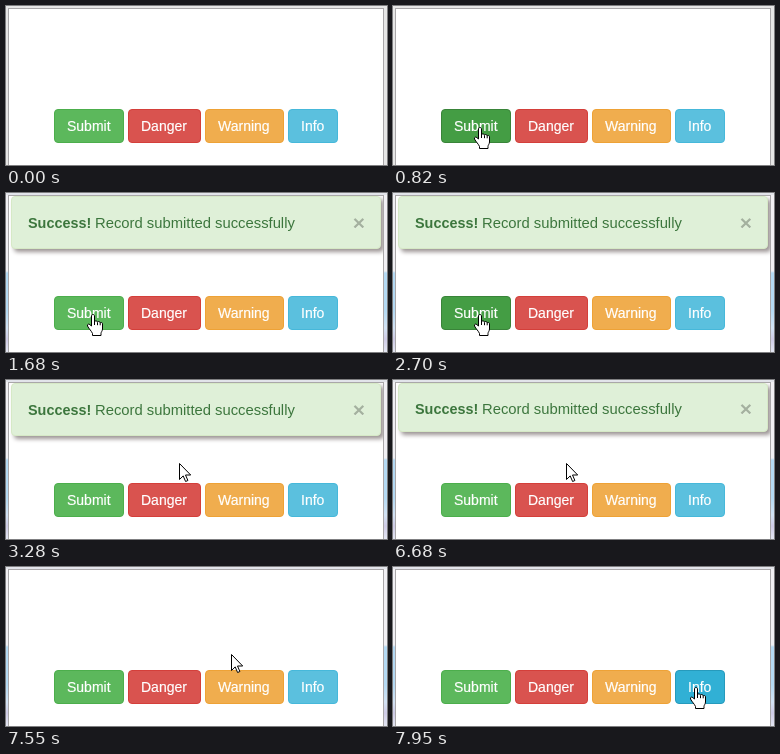
Recreate the animation shown at these times as an HTML page. Size 381x159 px, loop 8 s.

```html
<!DOCTYPE html>
<html lang="en">
<head>
<meta charset="utf-8">
<title>Alert demo</title>
<style>
html, body { margin: 0; width: 100%; height: 100%; overflow: hidden; }
body { position: relative; background: #e6e6e6; font: 14px/20px "Liberation Sans", Arial, sans-serif; }
body.glass {
  background:
    linear-gradient(#e2e4ea, #e2e4ea) 0 0 / 100% 2px no-repeat,
    linear-gradient(#f1f0f4 0 78px, #b4daf4 80px 118px, #d3e3f4 135px, #cfcbe6 146px, #e3e6f2 159px);
}
#page { position: absolute; left: 3px; top: 3px; width: 374px; height: 156px; overflow: hidden; background: #fff; }
#edge { position: absolute; left: 2px; top: 2px; width: 374px; height: 170px; border: 1px solid #a9a7a9; }
.btn {
  position: absolute; top: 100px; height: 34px; box-sizing: border-box; padding: 6px 12px;
  border: 1px solid; border-radius: 4px; white-space: nowrap;
}
.btn span { color: #fff; -webkit-text-stroke: .2px #fff; }
.focus { outline: 1px solid #6aa9d8; outline-offset: -1px; box-shadow: inset 0 3px 5px rgba(0, 0, 0, .125); }
#alert {
  position: absolute; left: 2px; top: 0; width: 370px; box-sizing: border-box; overflow: hidden;
  background: #dff0d8; border: 1px solid #d6e9c6; border-radius: 4px; box-shadow: 3px 3px 4px #9c9595;
  color: #3c763d; font-size: 14.8px; line-height: 21px; white-space: nowrap;
}
#alert > * { position: absolute; }
#alert b { left: 16px; margin-top: 1px; font-size: 14.4px; }
#alert span { left: 83px; margin-top: 1px; }
#alert i { right: 15px; font: bold 21px/21px "Liberation Sans", Arial, sans-serif; color: #000; opacity: .26; text-shadow: 0 1px 0 #fff; }
svg { position: absolute; left: 0; top: 0; width: 381px; height: 159px; }
</style>
</head>
<body>
<div id="edge"></div>
<div id="page">
  <div id="alert"><b>Success!</b><span>Record submitted successfully</span><i>×</i></div>
</div>
<svg fill="#fff" stroke="#000" stroke-linejoin="round">
  <path id="arrow" d="M.5 .5v16l3.7-3.6 2.4 5.6 2.3-1-2.4-5.5h5.2z"/>
  <path id="hand" d="M5.5 12V2c0-2 3-2 3 0v6c0-1.6 3-1.4 3 .3 .3-1.3 2.7-1 2.7.7 .4-1 2.3-.7 2.3.8v5.2c0 2-1.5 3-1.5 4.5v2h-8.5v-2c-1-2.5-3.5-4.5-5-7.5-.6-2 1.5-2.5 2.5-1.2zM8.5 8v3M11.5 8.5v2.7M14.2 9v2.3"/>
</svg>
<script>
const LOOP = 8000, CLICK = 1380, SHOW = 1680, GLASS = 1240;
const HIDE = 6585, SLIDE = 520;
const $ = id => document.getElementById(id);

// label, left, width, [fill, border], [hover fill, hover border]
const buttons = [
  ['Submit', 48, 70, ['#5cb85c', '#4cae4c'], ['#449d44', '#398439']],
  ['Danger', 122, 73, ['#d9534f', '#d43f3a']],
  ['Warning', 199, 79, ['#f0ad4e', '#eea236']],
  ['Info', 282, 50, ['#5bc0de', '#46b8da'], ['#31b0d5', '#269abc']]
].map(([label, left, width, normal, hover = normal]) => {
  const el = document.createElement('div');
  el.className = 'btn';
  el.innerHTML = `<span>${label}</span>`;
  el.style.left = left - 3 + 'px';
  el.style.width = width + 'px';
  $('page').append(el);
  return { el, normal, hover };
});

// time, pointer, x, y, hovered button
const steps = [
  [0, '', 0, 0], [410, 'arrow', 120, 156],
  [550, 'hand', 93, 129, 0], [700, 'hand', 86, 124, 0], [820, 'hand', 80, 121, 0],
  [CLICK, 'arrow', 85, 121, 0], [SHOW, 'hand', 80, 121], [2700, 'hand', 80, 121, 0],
  [2860, 'arrow', 161, 88], [3010, 'arrow', 172, 83], [3280, 'arrow', 173, 83],
  [6680, 'arrow', 173, 83], [6840, 'arrow', 173, 83], [6990, 'arrow', 173, 83], [7130, 'arrow', 173, 83],
  [7550, 'arrow', 225, 87], [7680, 'arrow', 276, 90],
  [7820, 'hand', 291, 114, 3], [7950, 'hand', 296, 120, 3]
];

// share of the alert still open while it slides up
function openness(t) {
  const p = Math.min(1, Math.max(0, (t - HIDE) / SLIDE));
  return t < SHOW ? 0 : (1 + Math.cos(Math.PI * p)) / 2;
}

function draw(now) {
  const t = now % LOOP;
  const [start, pointer, x, y, hovered] = steps.findLast(s => s[0] <= t);
  document.body.classList.toggle('glass', t >= GLASS);

  buttons.forEach(({ el, normal, hover }, i) => {
    const [fill, border] = i === hovered ? hover : normal;
    el.style.background = fill;
    el.style.borderColor = border;
    el.classList.toggle('focus', i === 0 && start === CLICK);
  });

  const open = openness(start);
  $('alert').style.display = open ? '' : 'none';
  $('alert').style.height = Math.round(53 * open) + 'px';
  for (const part of $('alert').children) part.style.top = Math.round(15 * open) + 'px';

  for (const name of ['arrow', 'hand']) {
    $(name).style.display = name === pointer ? '' : 'none';
    $(name).setAttribute('transform', `translate(${x} ${y})`);
  }
}

const begin = performance.now();
function tick() {
  draw(performance.now() - begin);
  requestAnimationFrame(tick);
}
tick();
</script>
</body>
</html>
```
